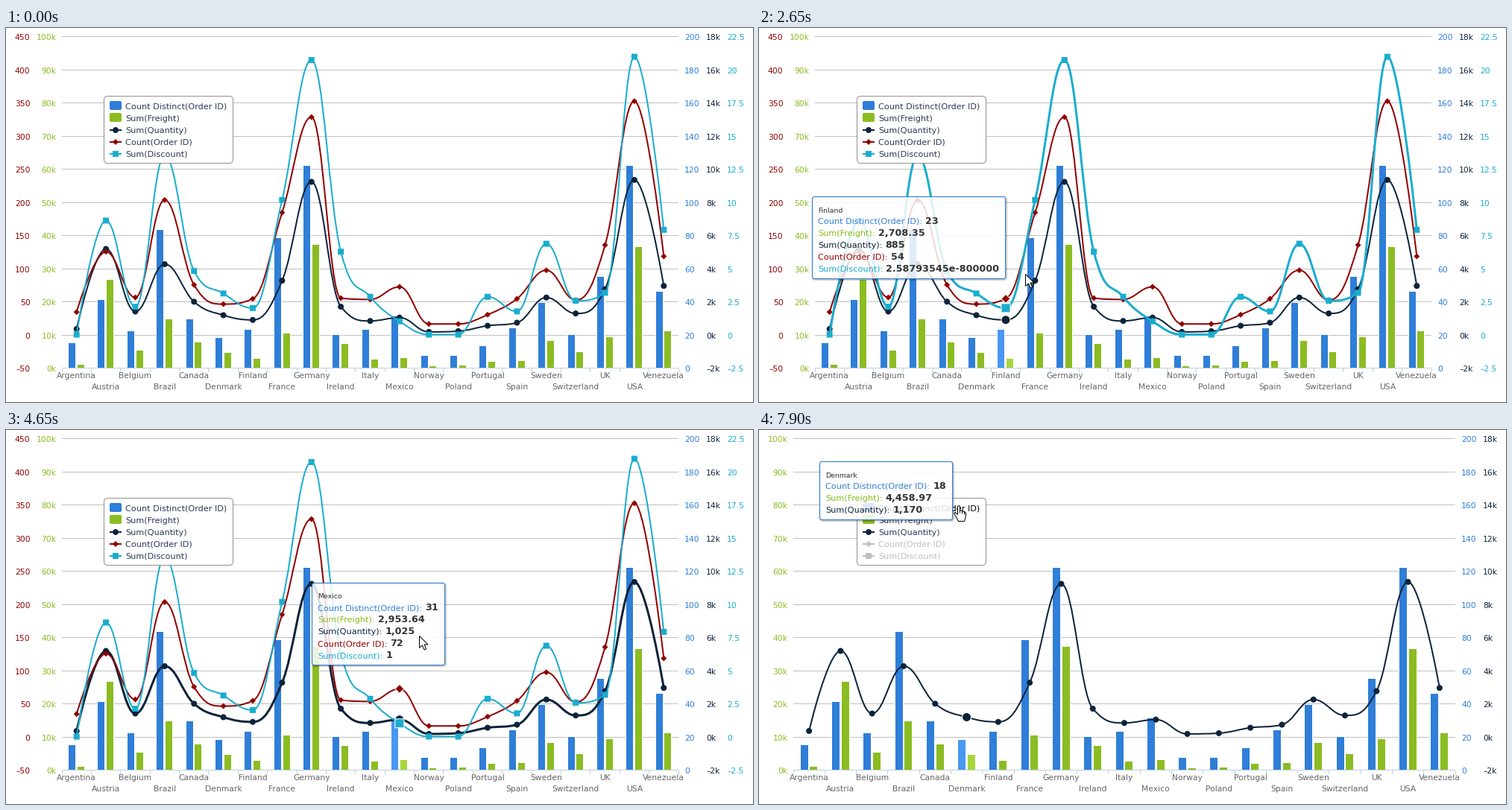
Animation, 1002 px wide and 502 px high, one loop 8000 ms. Source, as a matplotlib script:

```python
import numpy as np
import matplotlib.pyplot as plt
from matplotlib.animation import FuncAnimation
from matplotlib.patches import Circle, FancyBboxPatch, PathPatch, Polygon, Rectangle
from matplotlib.path import Path

W, H, DPI = 1002, 502, 64
PX = 72 / DPI  # points per pixel
STEP_MS, LOOP_MS = 80, 8000
TOP, BOTTOM = 11, 456

COUNTRIES = ("Argentina Austria Belgium Brazil Canada Denmark Finland France Germany Ireland Italy "
             "Mexico Norway Poland Portugal Spain Sweden Switzerland UK USA Venezuela").split()
N = len(COUNTRIES)

quantity = np.array([339, 5167, 1392, 4247, 1984, 1170, 885, 3254, 9213, 1684, 822,
                     1025, 161, 205, 533, 718, 2235, 1275, 2742, 9330, 2936])
lines = np.array([34, 125, 56, 203, 75, 46, 54, 184, 328, 55, 53,
                  72, 16, 16, 30, 54, 97, 52, 135, 352, 118])
discount = np.array([0, 8.6, 2.1, 13.5, 4.8, 3.1, 2, 10.15, 20.7, 6.25, 2.85,
                     1, 0, 0, 2.85, 1.75, 6.85, 2.55, 3.15, 20.95, 7.9])
# Orders and freight follow from how many lines there are and how large they run
orders = np.minimum(np.round(0.492 * lines - 0.004 * quantity), 122).astype(int)
freight = quantity * (1.7 + 0.083 * quantity / lines)


class Series:
    def __init__(self, name, color, low, step, unit, marker, values):
        self.name, self.color, self.marker, self.values = name, color, marker, values
        self.ticks = [f"{low + step * k:g}{unit}".replace("-", "\u2013") for k in range(11)]
        scale = 1000 if unit else 1
        self.y = BOTTOM - (BOTTOM - TOP) * (values / scale - low) / (10 * step)


DISTINCT = Series("Count Distinct(Order ID)", "#2f7ed8", 0, 20, "", None, orders)
FREIGHT = Series("Sum(Freight)", "#8bbc21", 0, 10, "k", None, freight)
QUANTITY = Series("Sum(Quantity)", "#0d233a", -2, 2, "k", "circle", quantity)
COUNT = Series("Count(Order ID)", "#910000", -50, 50, "", "diamond", lines)
DISCOUNT = Series("Sum(Discount)", "#1aadce", -2.5, 2.5, "", "square", discount)
ALL = [DISTINCT, FREIGHT, QUANTITY, COUNT, DISCOUNT]
LONG_DISCOUNTS = {"Brazil": "13.500000227242708", "Finland": "2.58793545e-800000"}
BRIGHT = {DISTINCT: "#4998f2", FREIGHT: "#a5d63b"}

# Timeline in ms
ENTER, HIDE_DISCOUNT, HIDE_COUNT, RESIZE = 1280, 6000, 7200, 400
THICK = [(1360, 2160, COUNT), (2160, 3120, DISCOUNT), (3120, 4160, COUNT),
         (4480, 7600, QUANTITY), (5120, 6000, DISCOUNT), (6560, 7200, COUNT)]
CURSOR = [(1280, 262, 4), (1840, 218, 260), (2640, 357, 330), (3760, 633, 358), (3840, 633, 358),
          (4400, 720, 330), (5120, 223, 169), (6000, 223, 169), (6720, 231, 148), (7200, 231, 148),
          (7520, 267, 101)]
TOOLTIP_EASE = 0.4

ARROW = [(0, 0), (0, 16), (4, 12.5), (6.5, 18.5), (9, 17.5), (6.5, 11.5), (11.5, 11.5)]
HAND = [(5, 1), (6.5, 0), (8, 1), (8, 6), (14, 8), (16, 10), (16, 14), (14, 21), (6, 21), (0, 10),
        (2, 9), (5, 12)]

plt.rcParams["font.family"] = "DejaVu Sans"
plt.rcParams["path.snap"] = False
fig = plt.figure(figsize=(W / DPI, H / DPI), dpi=DPI, facecolor="white")
ax = fig.add_axes([0, 0, 1, 1])


def text(x, y, s, color, size, **kw):
    return ax.text(x, y, s, color=color, fontsize=size * PX, va="baseline", **kw)


def line(xs, ys, color, width=1, **kw):
    ax.plot(xs, ys, color=color, lw=width * PX, solid_capstyle="butt", **kw)


def round_box(x, y, w, h, r, z, **kw):
    ax.add_patch(FancyBboxPatch((x, y), w, h, boxstyle=f"round,pad=0,rounding_size={r}", zorder=z, **kw))


def marker(kind, x, y, r, color, z, edge="none"):
    style = dict(fc=color, ec=edge, lw=PX, zorder=z)
    if kind == "circle":
        ax.add_patch(Circle((x, y), r, **style))
    elif kind == "square":
        ax.add_patch(Rectangle((x - r, y - r), 2 * r, 2 * r, **style))
    else:
        ax.add_patch(Polygon([(x, y - r), (x + r, y), (x, y + r), (x - r, y)], closed=True, **style))


def cursor_at(t):
    times, xs, ys = zip(*CURSOR)
    return np.interp(t, times, xs), np.interp(t, times, ys)


def swing(t, start):
    return 0.5 - 0.5 * np.cos(np.pi * np.clip((t - start) / RESIZE, 0, 1))


def plot_span(t):
    grow = swing(t, HIDE_DISCOUNT)
    return 75 - 29 * swing(t, HIDE_COUNT), 902 + 32 * grow


def visible(t):
    return [s for s in ALL if not (s is DISCOUNT and t >= HIDE_DISCOUNT or s is COUNT and t >= HIDE_COUNT)]


def hovered(t):
    left, right = plot_span(t)
    return int((cursor_at(t)[0] - left) / (right - left) * N - 0.18)


def value_label(s, i):
    if s is DISCOUNT:
        return LONG_DISCOUNTS.get(COUNTRIES[i], f"{s.values[i]:g}")
    return f"{s.values[i]:,.2f}" if s is FREIGHT else f"{s.values[i]:,}"


def tooltip_target(t):
    """Left of the hovered point, or right of it where there is no room."""
    left, right = plot_span(t)
    shown, i = visible(t), hovered(t)
    point = left + (i + 0.5) * (right - left) / N
    width = max(5.75 * len(s.name) + 8.7 * len(value_label(s, i)) + 24 for s in shown)
    x = point - width - 12
    # Between the two clicks the box keeps the height of the first one
    cy = cursor_at(HIDE_DISCOUNT if HIDE_DISCOUNT <= t < HIDE_COUNT else t)[1]
    return np.array([x if x > 7 else point + 14, max(4, cy - 13 - 16 * len(shown))])


def tooltip_path():
    path = {}
    spot = tooltip_target(ENTER)
    for t in range(ENTER, LOOP_MS, STEP_MS):
        spot = spot + TOOLTIP_EASE * (tooltip_target(t) - spot)
        path[t] = spot
    return path


TOOLTIP = tooltip_path()


def spline(xs, ys):
    """Smooth curve whose handles never overshoot the neighbouring points."""
    before, after = [(xs[0], ys[0])], [(xs[0], ys[0])]
    for i in range(1, len(xs) - 1):
        (x0, x, x1), (y0, y, y1) = xs[i - 1:i + 2], ys[i - 1:i + 2]
        lx, rx = (1.5 * x + x0) / 2.5, (1.5 * x + x1) / 2.5
        ly, ry = (1.5 * y + y0) / 2.5, (1.5 * y + y1) / 2.5
        ly += (ry - ly) * (rx - x) / (rx - lx) + y - ry
        ly = np.clip(ly, min(y0, y), max(y0, y))
        ry = np.clip(2 * y - ly, min(y1, y), max(y1, y))
        before.append((lx, 2 * y - ry))
        after.append((rx, ry))
    before.append((xs[-1], ys[-1]))
    verts = [(xs[0], ys[0])]
    for i in range(1, len(xs)):
        verts += [after[i - 1], before[i], (xs[i], ys[i])]
    return Path(verts, [Path.MOVETO] + [Path.CURVE4] * (len(verts) - 1))


def draw_axes(left, right, shown):
    columns = [(COUNT, 32.5, "right"), (FREIGHT, left - 7.5, "right"), (DISTINCT, right + 8, "left"),
               (QUANTITY, right + 37, "left"), (DISCOUNT, right + 65, "left")]
    for k in range(11):
        y = np.floor(BOTTOM - 44.5 * k + 0.5) + 0.5
        line([left, right], [y, y], "#c0c0c0", zorder=1)
        for s, x, ha in columns:
            if s in shown:
                text(x, y + 4.5, s.ticks[k], s.color, 10.8, ha=ha)
    line([left, right], [BOTTOM + 0.5] * 2, "#c0d0e0", zorder=3)
    step = (right - left) / N
    for i in range(N + 1):
        x = np.floor(left + i * step) + 0.5
        line([x, x], [BOTTOM + 1, BOTTOM + 6], "#c0d0e0", zorder=3)
    for i, name in enumerate(COUNTRIES):
        text(left + (i + 0.5) * step, 485 if i % 2 else 470, name, "#666666", 10.7, ha="center")


def draw_bars(left, step, hover):
    width = int(0.24 * step)
    for k, s in enumerate((DISTINCT, FREIGHT)):
        for i in range(N):
            x = np.round(left + step * (i + 0.23 + 0.3 * k)) - 0.5
            y = np.round(s.y[i]) - 0.5
            ax.add_patch(Rectangle((x, y), width + 1, BOTTOM + 0.5 - y, ec="white", lw=PX, zorder=2,
                                   fc=BRIGHT[s] if i == hover else s.color))


def draw_curves(xs, shown, thick, hover):
    for z, s in enumerate((QUANTITY, COUNT, DISCOUNT), 4):
        if s not in shown:
            continue
        ax.add_patch(PathPatch(spline(xs, s.y), fill=False, ec=s.color, zorder=z,
                               lw=(3 if s in thick else 2) * PX))
        for i, (x, y) in enumerate(zip(xs, s.y)):
            if i == hover:
                marker(s.marker, x, y, 6, s.color, z + 0.2, "white")
            else:
                marker(s.marker, x, y, 4, s.color, z + 0.1)


def draw_legend(shown, active):
    round_box(131.5, 91.5, 173, 90, 5, 10, fc="white", ec="#909090", lw=PX)
    for k, s in enumerate(ALL):
        y = 105 + 16 * k
        color = s.color if s in shown else "#c0c0c0"
        if s.marker:
            line([139, 155], [y, y], color, 2, zorder=11)
            marker(s.marker, 147, y, 4, color, 11)
        else:
            round_box(139, y - 7, 16, 12, 2, 11, fc=color, ec="none")
        ink = "#c0c0c0" if s not in shown else "black" if k == active else "#2b3a55"
        text(160, y + 4, s.name, ink, 11.3, zorder=11)


def draw_tooltip(x, y, i, shown):
    x, y = np.floor(x) + 0.5, np.floor(y) + 0.5
    text(x + 7.5, y + 21, COUNTRIES[i], "#333333", 9.4, zorder=22)
    edge = 0
    for k, s in enumerate(shown):
        base = y + 36.5 + 16 * k
        label = text(x + 7.5, base, s.name + ":", s.color, 11.3, zorder=22)
        value_x = x + 7.5 + label.get_window_extent().width + 4
        value = text(value_x, base, value_label(s, i), "#333333", 12.7, weight="bold", zorder=22)
        edge = max(edge, value_x + value.get_window_extent().width)
    w, h = np.round(edge + 8.5 - x), 30 + 16 * len(shown)
    for width, alpha in ((5, 0.05), (3, 0.1), (1, 0.15)):
        round_box(x + 1, y + 1, w, h, 3, 20, fill=False, ec="black", alpha=alpha, lw=width * PX)
    round_box(x, y, w, h, 3, 21, fc=(1, 1, 1, 0.85), ec=DISTINCT.color, lw=PX)


def draw_cursor(x, y, hand):
    x, y = np.round(x) + 0.5, np.round(y) + 0.5
    shape = np.array(HAND if hand else ARROW) + ((x - 6, y) if hand else (x, y))
    ax.add_patch(Polygon(shape, closed=True, fc="white", ec="black", lw=PX, zorder=30))
    if hand:
        for k in range(3):
            line([x + 2 + 3 * k] * 2, [y + 6 + k, y + 10 + k], "black", zorder=31)


def draw(frame):
    t = frame * STEP_MS
    ax.cla()
    ax.set(xlim=(0, W), ylim=(H, 0))
    ax.axis("off")

    shown = visible(t)
    left, right = plot_span(t)
    step = (right - left) / N
    cx, cy = cursor_at(t)
    entered = t >= ENTER
    in_legend = entered and 131 < cx < 305 and 92 < cy < 182
    hover = hovered(t) if entered else None
    marked = None if HIDE_DISCOUNT <= t < HIDE_COUNT + RESIZE else hover

    draw_axes(left, right, shown)
    draw_bars(left, step, hover)
    draw_curves(left + step * (np.arange(N) + 0.5), shown, [s for a, b, s in THICK if a <= t < b], marked)
    draw_legend(shown, int((cy - 97) // 16) if in_legend else None)
    if entered:
        draw_tooltip(*TOOLTIP[t], hover, shown)
        draw_cursor(cx, cy, in_legend)
    return []


anim = FuncAnimation(fig, draw, frames=LOOP_MS // STEP_MS, init_func=lambda: [], interval=STEP_MS,
                     repeat=True, repeat_delay=0, blit=False)
plt.show()
```
